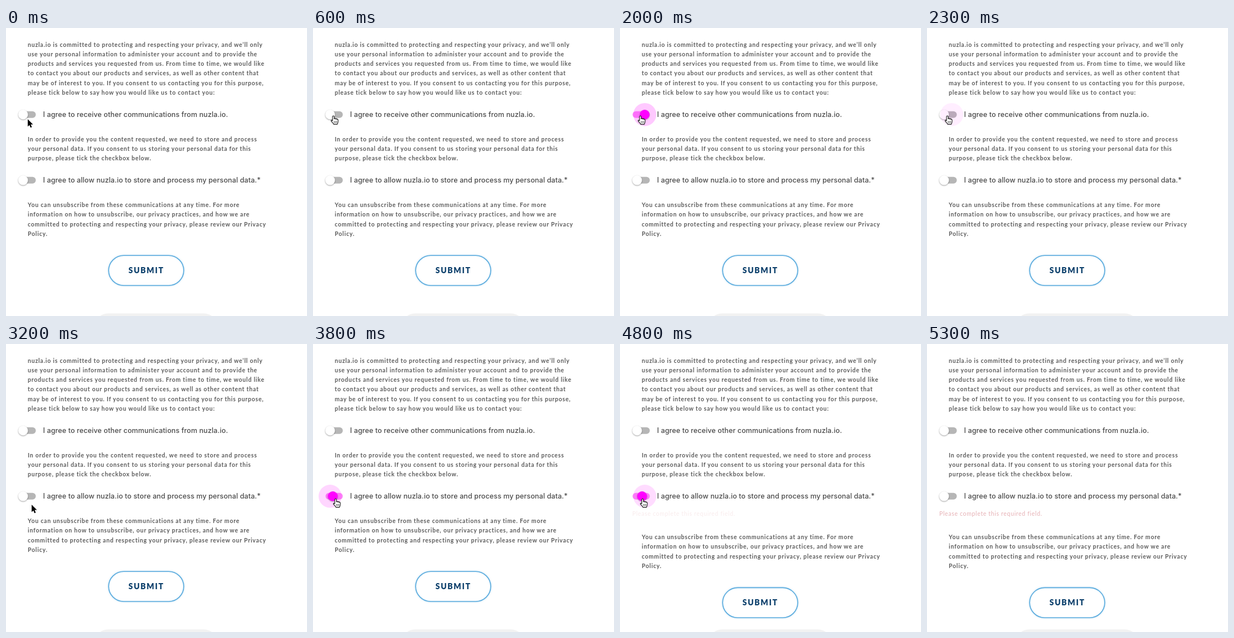
Recreate the animation shown at these times as an HTML page. Size 540x518 px, loop 5.4 s.

```html
<!DOCTYPE html>
<html lang="en">
<head>
<meta charset="utf-8">
<title>Consent form</title>
<style>
  html, body { margin: 0; width: 100%; height: 100%; overflow: hidden; background: #fff; }
  svg { display: block; width: 540px; height: 518px; }
  .para, .error { font: 700 10.5px Lato, sans-serif; letter-spacing: .77px; fill: #5c5c5c; }
  .error { font-weight: 400; letter-spacing: .67px; fill: #e6b0b4; }
  .label { font: 500 12.5px Inter, sans-serif; letter-spacing: .12px; fill: #4a4a4a; }
  .submit { font: 900 14px Lato, sans-serif; letter-spacing: 1.65px; fill: #0b3f6b; }
  .thumb { filter: drop-shadow(0 1px 1.3px rgba(0, 0, 0, .38)); }
  .button { filter: drop-shadow(0 0 1.5px rgba(88, 170, 221, .5)); }
</style>
</head>
<body>
<svg id="stage" viewBox="0 0 540 518"></svg>
<script>
const LOOP = 5400, STEP = 100;
const LEFT = 30.7, TRAVEL = 13.8;
const stage = document.getElementById('stage');

function set(el, attrs) {
  for (const key in attrs) el.setAttribute(key, attrs[key]);
}

function add(tag, attrs, parent = stage, text = '') {
  const el = document.createElementNS('http://www.w3.org/2000/svg', tag);
  set(el, attrs);
  el.textContent = text;
  parent.appendChild(el);
  return el;
}

function paragraph(y, lines, parent) {
  lines.forEach((line, i) =>
    add('text', { class: 'para', x: 39, y: y + i * 17.2 }, parent, line));
}

const ramp = (t, from, to) => Math.max(0, Math.min(1, (t - from) / (to - from)));
const smooth = k => k * k * (3 - 2 * k);
const mix = (a, b, k) =>
  `rgb(${a.map((v, i) => Math.round(v + (b[i] - v) * k)).join()})`;

// on and off are click times; fade is how long each ripple takes to settle
function makeToggle(y, text, on, off) {
  add('text', { class: 'label', x: 66.5, y: y + 4.5 }, stage, text);
  const track = add('rect', { x: 22.5, y: y - 6, width: 31, height: 12, rx: 6 });
  const thumb = add('circle', { class: 'thumb', cy: y, r: 8.7 });
  const ripple = add('circle', { cy: y, r: 20.7, fill: '#f0f' });
  const slide = (t, click) => smooth(ramp(t, click + 80, click + 380));

  return t => {
    const p = slide(t, on.time) - slide(t, off.time);
    const tint = Math.min(1, p * 3.2);
    const click = t < off.time ? on : off;
    const left = 1 - ramp(t, click.time, click.time + click.fade);
    set(track, { fill: mix([182, 182, 182], [252, 140, 248], tint) });
    set(thumb, { cx: LEFT + TRAVEL * p, fill: mix([255, 255, 255], [255, 0, 255], tint) });
    set(ripple, {
      cx: click === on ? LEFT : LEFT + TRAVEL,
      opacity: t < click.time ? 0 : Math.max(click.rest || 0, .27 * left ** 1.3)
    });
  };
}

paragraph(33.7, [
  'nuzla.io is committed to protecting and respecting your privacy, and we’ll only',
  'use your personal information to administer your account and to provide the',
  'products and services you requested from us. From time to time, we would like',
  'to contact you about our products and services, as well as other content that',
  'may be of interest to you. If you consent to us contacting you for this purpose,',
  'please tick below to say how you would like us to contact you:'
]);
paragraph(203.7, [
  'In order to provide you the content requested, we need to store and process',
  'your personal data. If you consent to us storing your personal data for this',
  'purpose, please tick the checkbox below.'
]);

add('rect', { x: 157, y: 513.3, width: 224, height: 60, rx: 27, fill: '#f2f2f2' });

const lower = add('g', {});
paragraph(322.1, [
  'You can unsubscribe from these communications at any time. For more',
  'information on how to unsubscribe, our privacy practices, and how we are',
  'committed to protecting and respecting your privacy, please review our Privacy',
  'Policy.'
], lower);
add('rect', {
  class: 'button', x: 184.2, y: 409.2, width: 134.6, height: 53.8, rx: 26.9,
  fill: '#fff', stroke: '#58aadd', 'stroke-width': 1.6
}, lower);
add('text', { class: 'submit', x: 219.8, y: 441.3 }, lower, 'SUBMIT');

const error = add('text', { class: 'error', x: 22, y: 308.5 }, stage,
  'Please complete this required field.');

const toggles = [
  makeToggle(155.7, 'I agree to receive other communications from nuzla.io.',
    { time: 900, fade: 400, rest: .06 }, { time: 1900, fade: 600 }),
  makeToggle(273.8, 'I agree to allow nuzla.io to store and process my personal data.*',
    { time: 3600, fade: 600 }, { time: 4600, fade: 500 })
];

const ring = add('circle', { fill: 'none', stroke: '#111', 'stroke-width': 1.6 });
const cursor = add('g', {});
const arrow = add('path', {
  d: 'M0 0V13.2L3 10.4L5.1 15.2L7.4 14.2L5.4 9.6H9.5Z',
  fill: '#000', stroke: '#fff', 'stroke-width': 1, 'paint-order': 'stroke'
}, cursor);
const hand = add('g', {}, cursor);
add('path', {
  d: 'M-2 2C-2 0 1 0 1 2V6C1 4.8 3.6 4.8 3.6 6.4C3.8 5.2 6 5.4 6 7C6.4 6 8 6.4 8 8' +
     'V11C8 13 6.8 14 6.6 15.6H0C-.4 14-2.4 12.6-4 10.4C-5.4 8.4-3.6 7.6-2 9.4Z',
  fill: '#fff', stroke: '#111', 'stroke-width': 1.1, 'stroke-linejoin': 'round'
}, hand);
add('path', { d: 'M1 10v3.2M3.2 10v3.2M5.4 10v3.2', stroke: '#111', 'stroke-width': .8 }, hand);

const moves = [
  { from: 300, to: 600, x: 37, y: 157.5 },
  { from: 2700, to: 3200, x: 46, y: 289 },
  { from: 3200, to: 3400, x: 41, y: 278 },
  { from: 4900, to: 5100, x: 54, y: 267 },
  { from: 5100, to: 5200, x: 99, y: 220 }
];

function cursorAt(t) {
  let x = 39, y = 164;
  for (const m of moves) {
    const k = smooth(ramp(t, m.from, m.to));
    x += (m.x - x) * k;
    y += (m.y - y) * k;
  }
  return { x, y };
}

// Click rings last one step: start time and radius
const rings = { 100: 19, 1900: 26.3, 3600: 26.3, 4600: 26.3 };

function draw(t) {
  toggles.forEach(toggle => toggle(t));

  set(lower, { transform: `translate(0 ${t < 4800 ? 0 : 29.2})` });
  set(error, { opacity: ramp(t, 4700, 5100) });

  const { x, y } = cursorAt(t);
  const pointing = (t >= 400 && t < 2800) || (t >= 3300 && t < 5000);
  set(ring, { cx: x, cy: y - 1, r: rings[t] || 0, opacity: rings[t] ? 1 : 0 });
  set(hand, { opacity: pointing ? 1 : 0 });
  set(arrow, { opacity: pointing ? 0 : 1 });
  set(cursor, { transform: `translate(${x} ${y})`, opacity: t < 5300 ? 1 : 0 });
}

const start = performance.now();
function tick() {
  const t = (performance.now() - start) % LOOP;
  draw(Math.floor(t / STEP) * STEP);
  requestAnimationFrame(tick);
}
tick();
</script>
</body>
</html>
```
